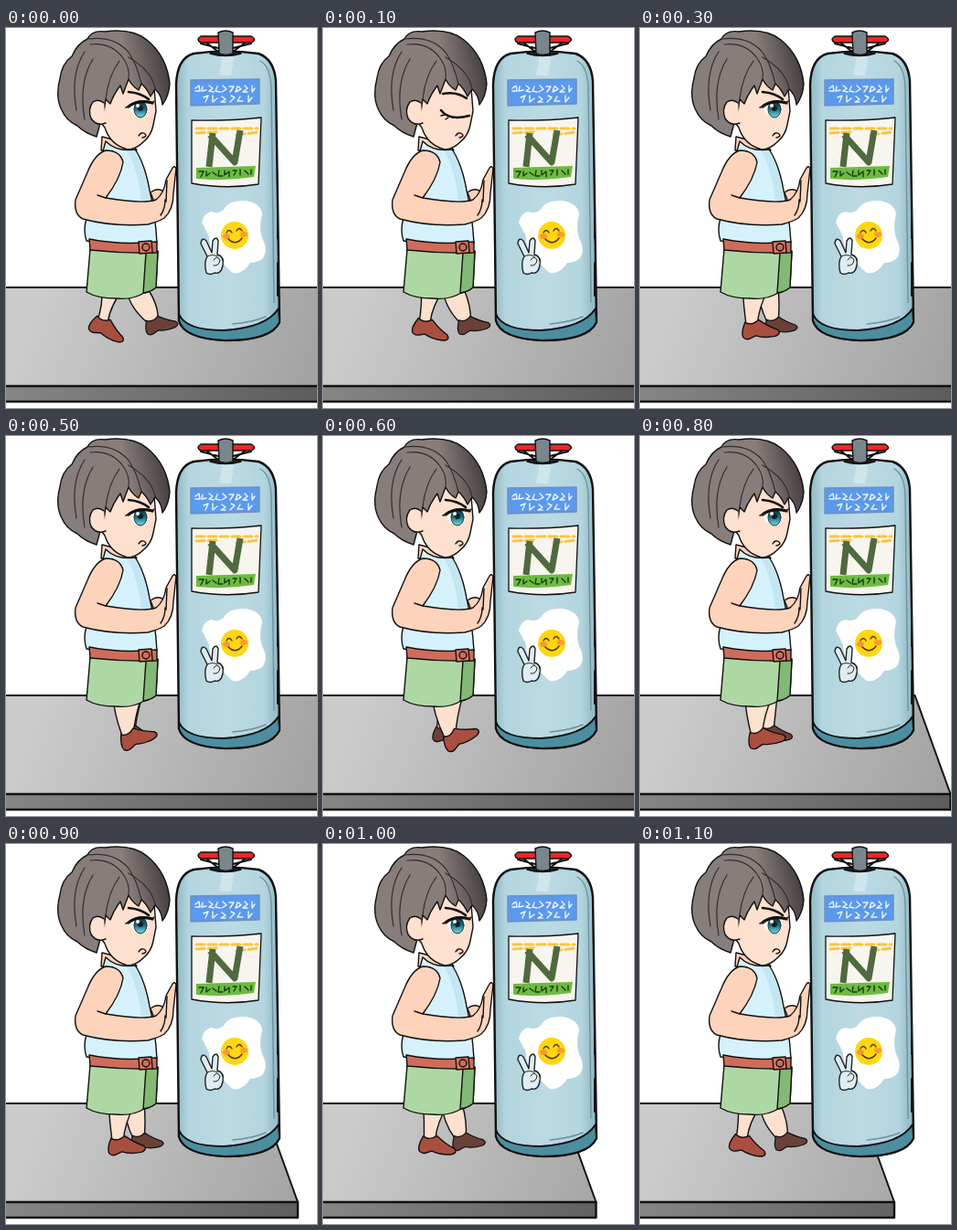
These frames come from a looping animation (340 by 416 pixels, 1200 ms). An HTML page:

```html
<!DOCTYPE html>
<html lang="en">
<head>
<meta charset="utf-8">
<title>Pushing the cylinder</title>
<style>
html, body { margin: 0; width: 100%; height: 100%; overflow: hidden; background: #fff; }
svg { display: block; width: 340px; height: 416px; }
.line { fill: none; }
.skin { fill: #fde0ce; }
.arm { fill: #fdd3bb; }
</style>
</head>
<body>
<svg viewBox="0 0 340 416" stroke="#111" stroke-width="1.4" stroke-linejoin="round" stroke-linecap="round">
  <defs>
    <linearGradient id="floor" gradientUnits="userSpaceOnUse" x1="40" y1="290" x2="320" y2="400">
      <stop stop-color="#cbcbcb"/><stop offset="1" stop-color="#a3a3a3"/>
    </linearGradient>
    <linearGradient id="side" gradientUnits="userSpaceOnUse" x1="0" x2="340">
      <stop stop-color="#858585"/><stop offset="1" stop-color="#5c5c5c"/>
    </linearGradient>
    <linearGradient id="steel">
      <stop stop-color="#8fb7c4"/><stop offset=".12" stop-color="#b3d5df"/>
      <stop offset=".5" stop-color="#bcdae3"/><stop offset=".85" stop-color="#b3d5df"/><stop offset="1" stop-color="#8db4c1"/>
    </linearGradient>
    <linearGradient id="hair" x1="0" y1=".6" x2="1" y2=".4">
      <stop stop-color="#877d7a"/><stop offset=".65" stop-color="#877d7a"/><stop offset="1" stop-color="#433d3c"/>
    </linearGradient>
    <linearGradient id="iris" x2="0" y2="1">
      <stop stop-color="#0c252d"/><stop offset=".5" stop-color="#1f6f80"/><stop offset="1" stop-color="#7fdbe4"/>
    </linearGradient>
    <path id="shoe" d="M-7-2Q-13 9-11 14Q-8 18-3 16L3 14Q12 18 24 17Q32 15 27 10Q18 6 8-3Q0 3-7-2Z"/>
  </defs>

  <g id="platform">
    <path id="top" fill="url(#floor)" stroke-width="2"/>
    <path id="front" fill="url(#side)" stroke-width="2.4"/>
  </g>

  <!-- Cylinder -->
  <path fill="url(#steel)" stroke-width="2.4" d="M189 320L186 62Q187 33 205 28Q240 23 276 28Q293 34 295 58L299 322Q290 342 240 342Q194 340 189 320Z"/>
  <path fill="#cfe5ec" stroke="none" d="M237 29L250 29L246 52L233 52Z"/>
  <path fill="#4c8ea0" stroke-width="2" d="M189 313Q196 331 238 331Q285 328 298 307L299 322Q290 342 240 342Q194 340 189 320Z"/>
  <path class="line" stroke="#6f929d" d="M278 36Q289 42 290 65L293 300M248 324Q270 322 284 316"/>
  <path class="line" stroke-width="2" d="M297 185V230M297 257V293"/>
  <path fill="#222" d="M223 28Q240 20 257 28Q240 33 223 28Z"/>
  <path class="line" stroke-width="2" d="M213 17L232 22M218 15L232 26M268 17L248 22M263 15L248 26"/>
  <path fill="#ef2525" d="M213 9H233V16H213Q207 13 213 9ZM247 9H268Q275 13 268 16H247Z"/>
  <path fill="#79868c" d="M232 5Q240 1 248 5V28Q240 31 233 28Z"/>

  <!-- Labels -->
  <path fill="#5b99ed" stroke="#6d8fbd" d="M202 57L277 56V83L202 85Z"/>
  <g class="line" stroke="#eef6ff" stroke-width="1.4">
    <path d="M207 66l4-3 1 6-5 0M215 64l-1 5 5-1M222 63l4 3-4 3 5 1M231 64l-2 5 5 1M237 63l4 4-5 3M244 64l5 0-4 6M253 64l-2 6 6-3-3-3M261 63l3 3-5 4 5 0M269 63v7l3-4"/>
    <path d="M216 76l5-2-3 7M226 74v7l5-4M236 75l4 3-5 3 5 0M246 74l4 2-5 5M256 75l-3 5 6 0M265 74v7l4-5"/>
  </g>
  <path fill="#f7f5ee" stroke-width="1.3" d="M203 101Q242 102 279 98L276 171Q240 177 203 170Z"/>
  <path class="line" stroke="#f9c63f" stroke-width="3" stroke-dasharray="9 4" d="M208 110L275 110M208 115L230 114M252 117L276 114"/>
  <path class="line" stroke="#50693f" stroke-width="7" stroke-linecap="butt" d="M222 152L226 115M223 117L250 147L256 112"/>
  <path fill="#6dbb42" stroke="none" d="M208 153L273 151L271 163Q240 168 208 165Z"/>
  <path class="line" stroke="#1b3814" d="M211 157l5 0-3 6M219 157v5l4-3M226 158l4 3M233 156l-1 6 5 0M239 156v5l5-4v6M248 156l4 0-3 5M256 155v6M261 156l4 4M268 155v5"/>

  <!-- Stickers -->
  <path fill="#fff" stroke="none" d="M214 213Q216 203 224 201Q232 204 238 199Q243 188 262 189Q279 192 280 204Q276 218 280 230Q287 242 281 252Q275 257 267 257Q259 270 248 268Q241 263 236 255Q222 246 222 228Z"/>
  <circle cx="250" cy="227" r="15" fill="#ffd60f" stroke="none"/>
  <path fill="#f79a32" stroke="none" d="M237 228a4 3 0 1 0 8 0a4 3 0 1 0-8 0M256 226a4 3 0 1 0 8 0a4 3 0 1 0-8 0"/>
  <path class="line" stroke="#4b310b" d="M241 224q3-5 6 0M252 222q3-5 6 0M243 231q8 8 15-1"/>
  <path fill="#dfedf2" stroke="#222" d="M219 268Q216 257 220 250L213 236Q214 228 219 233L225 246L226 233Q230 227 232 233L231 248Q239 250 237 260Q235 270 228 268Q223 271 219 268Z"/>
  <path class="line" stroke="#222" stroke-width="1" d="M220 250Q226 247 231 250M227 254Q231 248 234 254Q233 261 227 260"/>

  <!-- Boy -->
  <g id="far"><path class="skin"/><use href="#shoe" fill="#6b4037"/></g>
  <g id="near"><path class="skin"/><use href="#shoe" fill="#a94f3f"/></g>
  <path fill="#aed8a3" d="M92 242L166 244L164 284Q158 289 151 290Q138 298 120 296Q100 296 88 289Z"/>
  <path fill="#83b876" d="M153 246L166 245L164 284Q158 289 150 290Z"/>
  <path class="arm" d="M105 119L104 134H143L139 128Z"/>
  <path fill="#d5f1fb" d="M109 124Q121 136 141 133Q152 149 157 178Q163 202 165 235Q125 240 88 233Q84 222 88 208Q93 174 106 135Z"/>
  <path fill="#c3e6f2" stroke="none" d="M133 135L141 134Q152 150 157 188L148 190Q146 160 133 135Z"/>
  <path fill="#cf6c5a" d="M91 231Q126 238 165 234L165 246Q128 247 92 243Z"/>
  <path fill="#d87963" d="M145 234L159 233L160 246L146 247Z"/>
  <circle cx="153" cy="240" r="4" fill="#cf6c5a"/>
  <path class="arm" d="M158 180Q166 174 172 179L164 196Z"/>
  <path class="arm" d="M109 134Q97 138 89 158L76 188Q74 204 84 209Q117 218 155 215Q167 212 173 208Q183 199 183 181L186 154Q184 149 181 155L175 166Q173 181 164 188Q151 193 109 186Q125 165 128 147Q125 134 109 134Z"/>
  <path class="line" d="M174 188Q174 198 169 205M176 167L175 190M109 186L100 183"/>

  <path class="skin" d="M101 77Q95 94 108 109Q114 128 133 133Q142 133 151 124Q159 117 161 106L164 91L162 65L124 51Z"/>
  <path class="line" d="M145 118q3-5 7-2q3 3-3 4"/>
  <g id="open">
    <ellipse cx="146" cy="89" rx="10" ry="8" fill="#f4fbfc" stroke="none"/>
    <ellipse cx="147" cy="89" rx="7" ry="9" fill="url(#iris)" stroke="#183940" stroke-width="1"/>
    <circle cx="147" cy="88" r="3" fill="#0b2027" stroke="none"/>
    <circle cx="144" cy="85" r="2" fill="#fff" stroke="none"/>
    <path class="line" stroke-width="3.2" d="M134 86Q144 78 160 82"/>
    <path class="line" d="M134 86l-3 1M160 82l2-2"/>
    <path class="line" stroke-width="2.6" d="M134 70Q147 71 156 78"/>
  </g>
  <g id="closed">
    <path class="line" stroke-width="2.6" d="M129 90Q138 102 160 96"/>
    <path class="line" d="M133 95l-4 1M137 98l-3 2"/>
    <path class="line" stroke-width="2.4" d="M131 72Q146 69 157 77"/>
  </g>
  <path fill="url(#hair)" d="M89 12Q94 2 108 4Q138 0 154 13Q176 31 179 61Q178 75 171 84Q170 73 163 67L158 75Q154 66 148 61L145 68Q138 64 134 56L128 72L125 63Q118 72 114 83L109 78L107 92L103 104L99 119Q86 115 78 107Q66 102 60 88Q54 74 59 55Q61 39 72 31Q78 17 89 12Z"/>
  <path class="skin" d="M107 82Q101 77 95 81Q89 89 93 99Q99 108 109 104"/>
  <path class="line" stroke="#332c2b" stroke-width="1.2" d="M89 12Q120 8 135 28Q143 40 148 61M92 18Q115 15 128 33Q136 44 134 56M124 36Q112 52 109 78M134 32Q160 47 163 67M86 26Q70 50 77 90M95 34Q79 60 86 100"/>
</svg>
<script>
const get = id => document.getElementById(id);
const near = get('near').children, far = get('far').children;

function drawLeg([leg, shoe], hip, half, x, y, turn, size) {
  leg.setAttribute('d', `M${hip - half} 284Q${hip - half + 1} 304 ${x - 6} ${y + 2}L${x + 6} ${y + 2}Q${x + 8} 305 ${hip + half} 284Z`);
  shoe.setAttribute('transform', `translate(${x} ${y}) rotate(${turn}) scale(${size})`);
}

function draw(now) {
  const step = Math.floor(now % 1200 / 100);

  // The feet pass each other and swing back the same way.
  const s = Math.min(step, 12 - step);
  drawLeg(near, 117 + 3.2 * s, 12 + .8 * s, 105.5 + 5.5 * s, 319.5 + 1.3 * s, 20 - 9 * s, 1);
  drawLeg(far, 143 - s, 11, 160 - 5 * s, 320, 3 * s - 18, .88);

  const blink = step % 6 === 1;
  get('open').style.display = blink ? 'none' : '';
  get('closed').style.display = blink ? '' : 'none';

  // The platform's end slides into view late in the loop.
  const edge = step < 8 ? 400 : 319 - 20.5 * (step - 9);
  get('top').setAttribute('d', `M-5 284H${edge - 39}L${edge} 392H-5Z`);
  get('front').setAttribute('d', `M-5 392H${edge}V409H-5Z`);
}

const start = performance.now();
function tick() {
  draw(performance.now() - start);
  requestAnimationFrame(tick);
}
tick();
</script>
</body>
</html>
```
